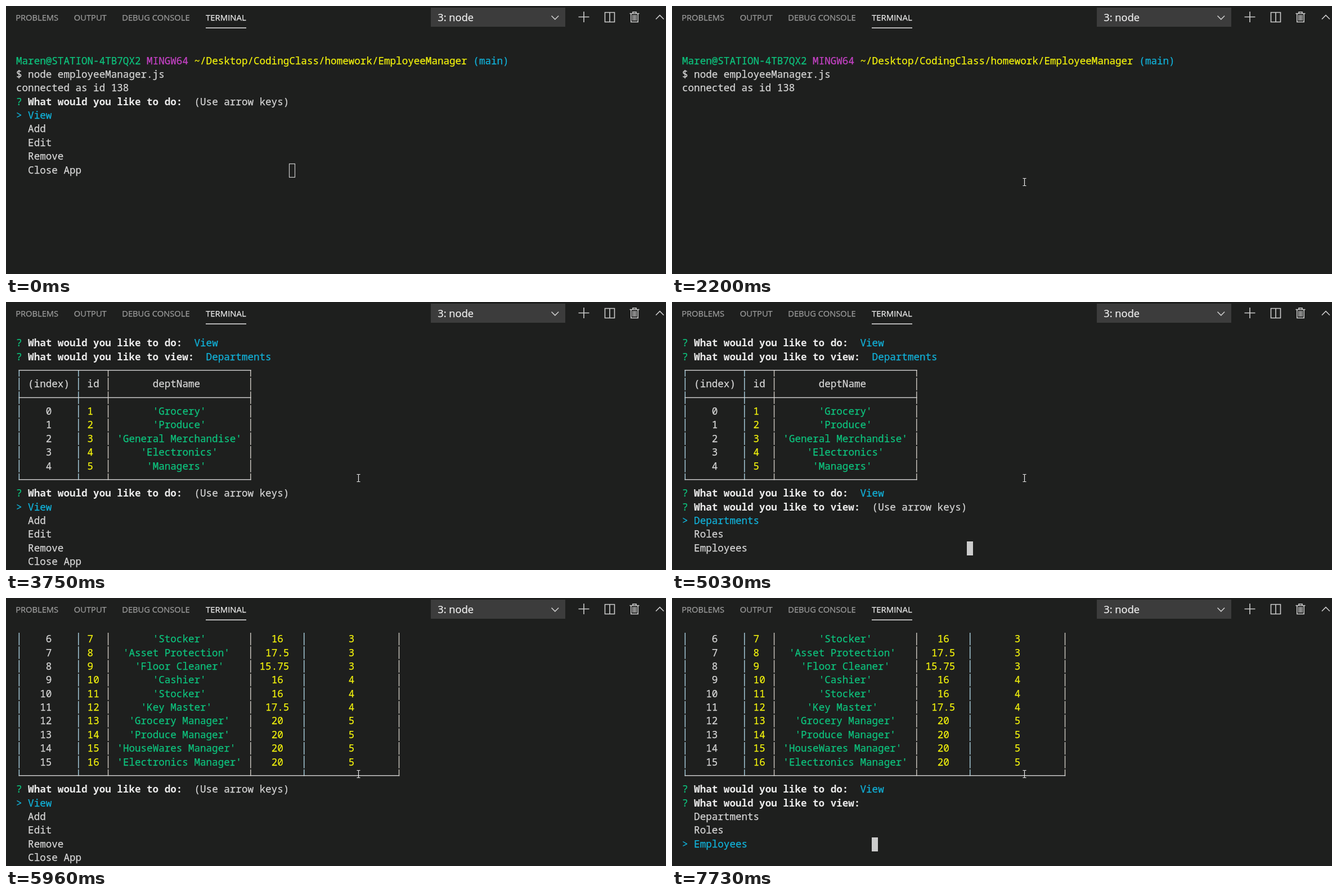
Write an HTML page that moves like this. It is 1173 by 478 pixels and loops after 8000 ms.

```html
<!DOCTYPE html>
<html lang="en">
<head>
<meta charset="utf-8">
<title>Terminal session</title>
<style>
  html, body { margin: 0; width: 100%; height: 100%; overflow: hidden; background: #1e1f1e; }
  svg { display: block; width: 1173px; height: 478px; }
  text { white-space: pre; fill: currentColor; stroke: currentColor; stroke-width: 0.25; }
  .tab { font: 14.7px "Open Sans", "Noto Sans", sans-serif; color: #9c9c9c; }
  .tab.on { font-size: 14.9px; color: #ececec; }
  .pick { font: 18.3px "Open Sans", "Noto Sans", sans-serif; color: #f0f0f0; }
  .icon { fill: none; stroke: #cccccc; stroke-width: 1.6; }
  #screen { font: 17.58px "Noto Sans Mono", "DejaVu Sans Mono", monospace; }
  #screen .bold { font-weight: 700; stroke: none; }
</style>
</head>
<body>
<svg viewBox="0 0 1173 478">
  <rect width="1173" height="478" fill="#1e1f1e"/>
  <g>
    <text class="tab" x="17.2" y="25.8">PROBLEMS</text>
    <text class="tab" x="120.8" y="25.8">OUTPUT</text>
    <text class="tab" x="206.2" y="25.8">DEBUG CONSOLE</text>
    <text class="tab on" x="355" y="25.8">TERMINAL</text>
    <rect x="355" y="38.3" width="72" height="1.5" fill="#e7e7e7"/>
    <rect x="755" y="3" width="239" height="34" fill="#3c3c3c"/>
    <text class="pick" x="767.3" y="27.4">3: node</text>
    <path class="icon" d="M969.5 17.5l6.3 6.3 6.3-6.3"/>
    <path class="icon" d="M1017.5 19.5h19M1027 10v19"/>
    <path class="icon" d="M1064.500 11.500h17v17h-17zM1073 11.500v17"/>
    <path class="icon" d="M1108.500 13.500h17M1114 13.500v-2.700h6v2.700M1110.800 13.500v15h12.400v-15M1114.300 16v10M1117 16v10M1119.700 16v10"/>
    <path class="icon" d="M1155 23.500l7-7 7 7"/>
  </g>
  <g id="screen"></g>
  <path id="mouse" fill="none" stroke="#f0f0f0" stroke-width="1.2" d="M-3-6.500h2.200L0-6 .8-6.500H3M0-6V6M-3 6.500h2.200L0 6l.8.500H3"/>
</svg>
<script>
const LOOP = 8000, ROWS = 17, LEFT = 18, TOP = 62, CELL = 10.55, LINE = 24.375;
const FG = '#d6d6d6', WHITE = '#ebebeb', GREEN = '#0dc47e', CYAN = '#11b2da',
      YELLOW = '#f2f20c', MAGENTA = '#c642c6', CURSOR = '#cccccc';

const screen = document.getElementById('screen');
const mouse = document.getElementById('mouse');

// A line holds text runs [column, text, colour, bold], bar columns and an optional rule.
const line = (...runs) => ({ runs, bars: [] });
const blank = line();

const ask = (verb, answer, color = CYAN) => {
  const question = `What would you like to ${verb}:`;
  return line([0, '?', GREEN], [2, question, WHITE, true], [question.length + 4, answer, color]);
};

const menu = (items, chosen) => items.map((item, i) =>
  i === chosen ? line([0, '>', CYAN], [2, item, CYAN]) : line([2, item, FG]));

const HINT = '(Use arrow keys)';
const mainMenu = [ask('do', HINT, FG), ...menu(['View', 'Add', 'Edit', 'Remove', 'Close App'], 0)];
const viewMenu = (chosen, hint = '') =>
  [ask('view', hint, FG), ...menu(['Departments', 'Roles', 'Employees'], chosen)];

function table(widths, head, rows) {
  const bars = [0];
  widths.forEach(w => bars.push(bars[bars.length - 1] + w + 1));
  const row = (cells, color) => ({
    bars,
    runs: cells.map((cell, i) => {
      const text = String(cell);
      return [bars[i] + 1 + Math.floor((widths[i] - text.length) / 2), text, color(cell, i)];
    })
  });
  const rule = kind => ({ runs: [], bars, rule: kind });
  const tint = (cell, i) => i === 0 ? FG : typeof cell === 'number' ? YELLOW : GREEN;
  const body = rows.map(([name, ...rest], i) => row([i, i + 1, `'${name}'`, ...rest], tint));
  return [rule('top'), row(head, () => FG), rule('mid'), ...body, rule('end')];
}

const departments = table([9, 4, 23], ['(index)', 'id', 'deptName'],
  ['Grocery', 'Produce', 'General Merchandise', 'Electronics', 'Managers'].map(n => [n]));

const roles = table([9, 4, 23, 8, 15], ['(index)', 'id', 'title', 'salary', 'departmentId'], [
  ['Cashier', 16, 1], ['Stocker', 16, 1], ['Bagger', 15, 1],
  ['Cashier', 16, 2], ['Stocker', 16, 2],
  ['Cashier', 16, 3], ['Stocker', 16, 3], ['Asset Protection', 17.5, 3], ['Floor Cleaner', 15.75, 3],
  ['Cashier', 16, 4], ['Stocker', 16, 4], ['Key Master', 17.5, 4],
  ['Grocery Manager', 20, 5], ['Produce Manager', 20, 5],
  ['HouseWares Manager', 20, 5], ['Electronics Manager', 20, 5]
]);

const start = [
  blank,
  line([0, 'Maren@STATION-4TB7QX2', GREEN], [22, 'MINGW64', MAGENTA],
       [30, '~/Desktop/CodingClass/homework/EmployeeManager', YELLOW], [77, '(main)', CYAN]),
  line([0, '$ node employeeManager.js', FG]),
  line([0, 'connected as id 138', FG])
];
const view = ask('do', 'View');
const first = [...start, view, ask('view', 'Departments')];
const second = [...first, ...departments];
const third = [...second, view, ask('view', 'Roles')];
const fourth = [...third, ...roles];

// [time, lines, cursor column on the last line]
const states = [
  [0, [...start, ...mainMenu], 46],
  [2200, start],
  [2250, [...start, view, ...viewMenu(0, HINT)], 48],
  [3360, [...first, blank], 0],
  [3690, [...second, blank], 0],
  [3750, [...second, ...mainMenu]],
  [5030, [...second, view, ...viewMenu(0, HINT)], 48],
  [5500, [...second, view, ...viewMenu(1)], 32],
  [5770, [...second, view]],
  [5810, [...third, blank], 0],
  [5910, [...fourth, blank], 0],
  [5960, [...fourth, ...mainMenu]],
  [7040, [...fourth, view, ...viewMenu(0, HINT)], 48],
  [7500, [...fourth, view]],
  [7550, [...fourth, view, ...viewMenu(1)], 32],
  [7730, [...fourth, view, ...viewMenu(2)], 32]
];
// The terminal never scrolls back when lines are cleared.
let scrolled = 0;
for (const s of states) s.scroll = scrolled = Math.max(scrolled, s[1].length - ROWS);

const colX = col => LEFT + col * CELL;
const rowY = row => TOP + row * LINE;
const box = (x, y, w, h, fill) => `<rect x="${x}" y="${y}" width="${w}" height="${h}" fill="${fill}"/>`;

function drawLine({ runs, bars, rule }, row) {
  const y = rowY(row), mid = y + 11;
  const from = rule === 'top' ? mid - 0.7 : y;
  const to = rule === 'end' ? mid + 0.7 : y + 22.3;
  const barX = col => colX(col + 0.5) - 0.7;
  let out = '';
  for (const col of bars) {
    const cool = col === 0 || col === 10 || col === 48;
    out += box(barX(col), from, 1.5, to - from, cool ? '#a5c9d8' : '#c6c2ba');
  }
  if (rule) out += box(barX(0), mid - 0.7, barX(bars[bars.length - 1]) - barX(0) + 1.5, 1.4, FG);
  for (const [col, text, color, bold] of runs) {
    out += `<text x="${colX(col)}" y="${y + 17.2}" color="${color}" class="${bold ? 'bold' : ''}">${text.replace('>', '&gt;')}</text>`;
  }
  return out;
}

function drawScreen([, lines, cursor], scroll, focused) {
  let out = lines.slice(scroll).map(drawLine).join('');
  if (cursor !== undefined) {
    const x = Math.floor(colX(cursor)), y = Math.floor(rowY(lines.length - 1 - scroll));
    out += focused ? box(x, y, 11, 25, CURSOR)
      : `<rect x="${x + 0.5}" y="${y + 0.5}" width="10" height="24" fill="none" stroke="${CURSOR}" stroke-width="1.2"/>`;
  }
  screen.innerHTML = out;
}

function drawMouse(t) {
  const k = Math.max(0, Math.min(1, Math.floor((t - 390) / 55.7) / 6));
  const ease = (1 - Math.cos(Math.PI * k)) / 2;
  mouse.setAttribute('visibility', t < 390 ? 'hidden' : 'visible');
  mouse.setAttribute('transform', `translate(${1067 - 440.5 * ease} ${461 - 147 * ease})`);
}

let shown = '';
function render(t) {
  const state = states.filter(s => s[0] <= t).pop();
  const focused = t >= 780;
  const key = state[0] + '/' + focused;
  if (key !== shown) {
    drawScreen(state, state.scroll, focused);
    shown = key;
  }
  drawMouse(t);
}

const begin = performance.now();
function tick() {
  render((performance.now() - begin) % LOOP);
  requestAnimationFrame(tick);
}
tick();
</script>
</body>
</html>
```
